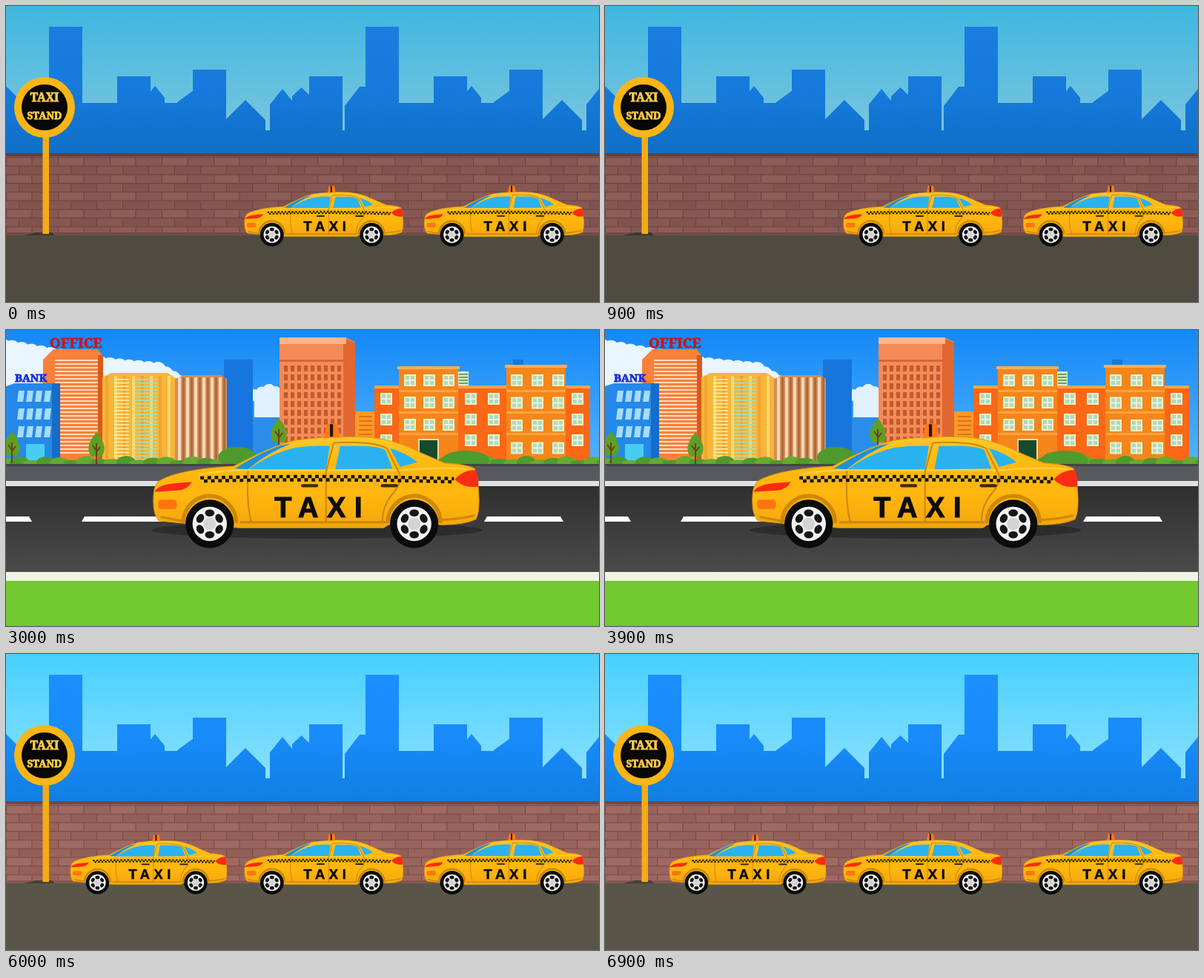
An HTML page for the animation above (7500 ms loop, 800x400 px).

```html
<!DOCTYPE html>
<html lang="en">
<head>
<meta charset="utf-8">
<title>Taxi ride</title>
<style>
html, body { margin: 0; width: 100%; height: 100%; overflow: hidden; }
svg { display: block; width: 100vw; height: 100vh; }
.serif { font-family: "Noto Serif", "Liberation Serif", serif; font-weight: 900; }
.plate { font-family: "Liberation Sans", Arial, sans-serif; font-weight: 700; letter-spacing: 11px; }
</style>
</head>
<body>
<svg id="stage" viewBox="0 0 800 400" preserveAspectRatio="none"></svg>
<script>
const SCENE_MS = 1500;

const range = (n, fn) => Array.from({ length: n }, (_, i) => fn(i)).join('');
const grid = (cols, rows, fn) => range(rows, r => range(cols, c => fn(c, r)));
const rect = (x, y, w, h, fill, extra = '') =>
  `<rect x="${x}" y="${y}" width="${w}" height="${h}" fill="${fill}" ${extra}/>`;
const path = (d, fill, extra = '') => `<path d="${d}" fill="${fill}" ${extra}/>`;
const line = (d, color, width, extra = '') =>
  path(d, 'none', `stroke="${color}" stroke-width="${width}" ${extra}`);
const oval = (x, y, rx, ry, fill, extra = '') =>
  `<ellipse cx="${x}" cy="${y}" rx="${rx}" ry="${ry}" fill="${fill}" ${extra}/>`;
const disc = (x, y, r, fill) => oval(x, y, r, r, fill);
const label = (text, x, y, size, fill, extra = '') =>
  `<text x="${x}" y="${y}" font-size="${size}" fill="${fill}" ${extra}>${text}</text>`;
const serif = (text, x, y, size, fill, extra = '') =>
  label(text, x, y, size, fill, `class="serif" stroke="${fill}" stroke-width=".8" ${extra}`);
const use = (id, x, y, s) => `<use href="#${id}" transform="translate(${x} ${y}) scale(${s})"/>`;
const drive = (x, y, s) => use('shadow', x, y, s) + use('taxi', x, y, s);

function gradient(id, y1, y2, ...colors) {
  const stops = colors.map((c, i) => `<stop offset="${i / (colors.length - 1)}" stop-color="${c}"/>`);
  return `<linearGradient id="${id}" gradientUnits="userSpaceOnUse" x1="0" x2="0" y1="${y1}" y2="${y2}">${stops.join('')}</linearGradient>`;
}

// Evenly spaced puffs along a ridge given by a few peaks and dips.
function cloud(ridge, r, base, fill) {
  const puffs = ridge.slice(1).map(([x2, y2], k) => {
    const [x1, y1] = ridge[k];
    const n = Math.ceil(Math.hypot(x2 - x1, y2 - y1) / (r * 1.4));
    return range(n + 1, i => {
      const t = i / n;
      return disc(x1 + (x2 - x1) * t, y1 + (y2 - y1) * t + r * 0.75, r, fill);
    });
  });
  const shape = ridge.map(([x, y]) => `${x} ${y + r}`).join('L');
  return path(`M${ridge[0][0]} ${base}L${shape}V${base}Z`, fill) + puffs.join('');
}

// A leafy mass: an ellipse edged with round lobes.
function canopy(x, y, rx, ry, lobes, fill) {
  const r = ry * 0.48;
  return oval(x, y, rx - r * 0.6, ry - r * 0.6, fill) + range(lobes, i => {
    const a = (i + 0.3) / lobes * 2 * Math.PI;
    return disc(x + (rx - r) * Math.cos(a), y + (ry - r) * Math.sin(a), r * (1 + 0.12 * Math.sin(5 * a)), fill);
  });
}

function wheel(x) {
  const y = 347;
  return disc(x, y, 31, '#0b0b0b') + disc(x, y, 22, '#f2f2f2') +
    range(6, i => {
      const angle = 30 + i * 60;
      return oval(x + 14, y, 4.6, 6, '#161616', `transform="rotate(${angle} ${x} ${y})"`);
    }) + disc(x, y, 8, '#d4d4d4');
}

function taxi() {
  const body = 'M181 314Q181 296 190 291Q215 277 284 273Q335 246 362 240Q405 233 458 236Q492 239 524 256L554 269Q584 271 592 276Q597 284 597 300Q600 330 594 341Q575 349 545 348H482L476 352H292Q230 348 188 343Q180 334 181 314Z';
  const glass = '#2ab2f0', seam = '#cd8808', ink = '#15130a';
  const belt = dy => `M241 ${288 + dy}Q400 ${284 + dy} 566 ${289 + dy}`;
  const arch = x => line(`M${x - 34} 346A34 35 0 0 1 ${x + 34} 346`, seam, 5);
  return path(body, 'url(#paint)', 'stroke="#e09a0c"') +
    line('M190 338Q215 343 222 344M292 345H478M546 342Q575 341 592 336', seam, 3) +
    line('M240 284Q280 276 330 278H500Q550 274 585 277', '#ffcf3e', 2) +
    path('M285 276Q318 255 345 246L357 244Q325 257 302 277Z', '#1c92dc') +
    path('M303 277Q332 256 364 249Q386 246 407 247L402 277ZM414 277L420 247H452Q470 248 478 252L487 276ZM484 250Q505 256 519 268L497 274Z', glass) +
    line('M412 243L402 280V346M412 243Q460 240 480 250L495 280Q502 292 486 310Q474 325 474 346M302 279Q300 320 306 344', seam, 2) +
    line(belt(0), ink, 4.2, 'stroke-dasharray="4.6"') +
    line(belt(4.2), ink, 4.2, 'stroke-dasharray="4.6" stroke-dashoffset="4.6"') +
    [370, 472].map(x => rect(x, 296, 22, 4, '#3a2c08', 'rx="2"')).join('') +
    path('M182 306Q187 297 207 295L230 293Q225 303 212 304Z', '#fb2a10') +
    rect(187, 316, 24, 12, '#ff7410', 'rx="4"') +
    path('M567 290Q577 278 594 278Q598 287 597 299Q579 302 567 290Z', '#f92c14') +
    path('M399 237L403 219Q410 217 417 219L420 236Z', '#ff7a18') + rect(407, 219, 4, 16, '#25160a') +
    [253, 515].map(x => arch(x) + wheel(x)).join('') +
    label('TAXI', 336, 338, 36, '#0c0c0c', 'class="plate" stroke="#0c0c0c" stroke-width="1"');
}

function sign() {
  return rect(49.5, 170, 8.5, 138, '#f5ac14') + disc(52, 137, 41, '#fab516') + disc(52, 137, 31, '#080705') +
    serif('TAXI', 52, 129, 15.5, '#ffcf45', 'text-anchor="middle"') +
    serif('STAND', 52, 152.5, 13.6, '#ffcf45', 'text-anchor="middle"');
}

// Skyline pieces share one fill and reach down to the same ground line.
const CITY_FLOOR = 211;
const tower = (x, top) => `M${x} ${CITY_FLOOR}V${top}h45V${CITY_FLOOR}Z`;
const gable = (x, w, peak, eave) =>
  `M${x} ${CITY_FLOOR}V${eave}L${x + w / 2} ${peak}L${x + w} ${eave}V${CITY_FLOOR}Z`;
const leanTo = x => `M${x} ${CITY_FLOOR}V135L${x + 20} 109H${x + 28}V${CITY_FLOOR}Z`;
const floor = (x, w, y) => `M${x} ${CITY_FLOOR}V${y}h${w}V${CITY_FLOOR}Z`;
const district = x => tower(x, 28) + floor(x + 40, 134, 131) + tower(x + 92, 95) +
  gable(x + 130, 26, 108, 124) + gable(x + 173, 44, 114, 130) + tower(x + 194, 86) +
  gable(x + 238, 54, 127, 154) + gable(x + 298, 34, 112, 133) + gable(x + 328, 25, 110, 122) +
  floor(x + 230, 197, 168);

function standScene(taxis, shade) {
  const city = floor(0, 60, 131) + gable(-14, 28, 108, 122) + leanTo(30) +
    district(58) + tower(409, 95) + leanTo(457) + district(485);
  return rect(0, 0, 800, 200, 'url(#standSky)') + path(city, 'url(#standCity)') +
    rect(0, 200, 800, 111, 'url(#bricks)') + rect(0, 199, 800, 4, '#704944') +
    rect(0, 306, 800, 4, '#855750') + rect(0, 310, 800, 90, '#5a5549') +
    path('M24 310L40 306H62L66 310Z', '#453f38') +
    rect(0, 0, 800, 400, '#000', `opacity="${shade}"`) +
    use('sign', 0, 0, 1) + taxis.map(p => use('taxi', ...p)).join('');
}

function trees(x, y, s, [dark, mid, deep, fresh, bright]) {
  const bark = '#96461f';
  const art = canopy(465, 80, 56, 40, 7, dark) + canopy(556, 62, 46, 34, 7, dark) +
    canopy(522, 38, 84, 46, 9, mid) + canopy(470, 64, 36, 24, 6, mid) +
    line('M541 104Q538 82 530 72L497 46M533 74L543 48', bark, 6) +
    canopy(522, 176, 46, 30, 7, deep) + canopy(614, 178, 48, 37, 7, deep) +
    canopy(564, 145, 94, 52, 10, fresh) + canopy(578, 122, 52, 28, 8, bright) +
    path('M561 248Q566 210 562 180L554 154L566 174V150L569 190L598 176L571 202Q568 225 569 248Z', bark);
  return `<g transform="translate(${x} ${y}) scale(${s}) translate(-565 -247)">${art}</g>`;
}

function countryScene() {
  const dash = x => path(`M${x - 20} 2Q${x - 16} -3 ${x} -3H${x + 13}L${x + 20} 2Q${x} 4 ${x - 20} 2Z`,
    '#f5f5f5', `transform="translate(0 ${348 + x / 150})"`);
  return rect(0, 0, 800, 260, 'url(#countrySky)') +
    path('M0 194Q30 188 60 202L122 218Q155 202 176 205Q230 212 272 225Q330 204 350 203L460 228Q500 194 535 195Q590 202 610 222Q680 195 730 193Q780 196 800 206V260H0Z', '#96b7d8') +
    path('M0 217Q45 198 85 225L122 250H0ZM488 250Q500 232 512 238Q530 215 552 232L562 250ZM605 246Q655 190 720 245ZM700 246Q725 175 800 216V250Z', '#468ccb') +
    path('M0 248Q120 250 185 244L400 249L600 244Q720 240 800 245V310H0Z', '#d8cc91') +
    path('M0 249Q55 267 122 256Q165 258 236 278V310H0ZM490 256Q590 262 660 262Q720 246 800 243V310H490Z', 'url(#hill)') +
    trees(247, 251, 0.49, ['#255f1e', '#347638', '#55932f', '#72b43a', '#93ce4c']) +
    trees(725, 249, 0.38, ['#28501a', '#35601f', '#4f7627', '#6b932c', '#84a838']) +
    trees(565, 247, 1, ['#265f1e', '#397a2a', '#559420', '#78b62a', '#9fd52f']) +
    rect(0, 303, 800, 14, '#9b8777') + rect(0, 282, 800, 3, '#d9dddd') + rect(0, 294, 800, 3, '#d9dddd') +
    range(64, i => rect(i * 12.6 + 1, 277, 7, 26, '#e6eaea', 'rx="3"')) +
    rect(0, 315, 800, 85, 'url(#countryRoad)') +
    [49, 205, 375, 556, 730].map(dash).join('') + drive(0, 0, 1);
}

function bushyTree(x, y) {
  return path(`M${x} ${y - 43}q17 20 7 33h-14q-10 -13 7 -33Z`, '#5f9f25') +
    line(`M${x} ${y}v-28m0 12l5 -7m-5 5l-5 -7`, '#6b4318', 2);
}

function windows(x, y, cols, rows, dx, dy) {
  return grid(cols, rows, (c, r) => {
    const left = x + c * dx, top = y + r * dy;
    return rect(left, top, 16, 16, '#f3efc4') + rect(left + 2, top + 2, 12, 12, '#a9dcc4') +
      line(`M${left + 8} ${top}v16M${left} ${top + 8}h16`, '#f6f0cc', 1.8);
  });
}

function apartments() {
  const block = (x, y) => rect(x, y, 80, 178 - y, '#f4861c') + rect(x - 2, y - 2, 84, 4, '#ffad55') +
    range(3, i => rect(x, 81 + i * 29, 80, 3, '#ffa33d'));
  return rect(610, 56, 14, 24, '#dcebd0') + range(5, i => rect(611, 59 + i * 4, 12, 1.8, '#5f9c52')) +
    rect(497, 77, 291, 101, '#fb6817') + rect(497, 75, 291, 4, '#ffa04a') +
    block(530, 51) + block(675, 49) +
    windows(537, 60, 3, 3, 26, 30) + windows(681, 60, 3, 4, 28, 30.5) +
    windows(505, 85, 1, 3, 0, 28) + windows(619, 85, 2, 3, 31, 28) + windows(763, 85, 1, 3, 0, 28) +
    rect(556, 147, 28, 31, '#f6d9a0') + rect(558, 149, 24, 29, '#174a2c');
}

function offices() {
  return path('M50 40L64 26H124L131 36V180H50Z', '#f9813a') + rect(124, 34, 7, 146, '#d9591c') +
    range(26, i => rect(66, 40 + i * 5, 58, 2, '#ffdcc0')) +
    path('M0 76L12 72H73V182H0Z', '#2589ea') + rect(62, 72, 11, 110, '#166cc9') +
    grid(4, 3, (c, r) => path(`M${17 + c * 12} ${82 + r * 24}h8l-2 15h-8Z`, '#a6dcfa')) +
    rect(27, 154, 25, 27, '#48cdf2') +
    path('M130 64L142 58H218L230 66V182H130Z', '#f7b638') +
    range(8, i => rect(134 + i * 12, 62, 4, 118, i % 2 ? '#ffd770' : '#f2a233')) +
    range(24, i => rect(146, 66 + i * 4.7, 20, 1.6, '#fff0a8') + rect(174, 66 + i * 4.7, 30, 1.8, '#a4dfb5')) +
    path('M228 66L240 61H290L298 66V180H228Z', '#d48d58') +
    range(6, i => rect(232 + i * 11, 64, 4, 115, '#f6d9b8') + rect(238 + i * 11, 64, 3, 115, '#b06a3c')) +
    path('M369 10H458L471 16V160H369Z', '#f58a56') + path('M455 10L471 17V160H455Z', '#e0672f') +
    rect(369, 10, 90, 9, '#ffb489') + rect(369, 40, 90, 3, '#d76638') +
    grid(9, 9, (c, r) => rect(375 + c * 9, 48 + r * 12, 5, 8, '#c05a30')) +
    rect(471, 110, 26, 68, '#fb9a26') + range(6, i => rect(476, 116 + i * 6, 18, 2, '#e06f16'));
}

function townScene() {
  const dash = (x, w) => path(`M${x + 4} 252h${w - 8}l4 7h${-w}Z`, '#fff');
  const bushes = range(46, i => oval(i * 18, 179, 13, 6 + 3 * Math.sin(i * 2.3), i % 2 ? '#4f9a2c' : '#65ab30'));
  return rect(0, 0, 800, 185, 'url(#townSky)') +
    cloud([[-5, 14], [60, 26], [140, 40], [205, 46], [245, 70]], 11, 130, '#e9f5ff') +
    cloud([[335, 82], [355, 75], [380, 84]], 8, 122, '#e2f1ff') +
    rect(294, 40, 39, 135, '#1676dd') + rect(333, 118, 36, 60, '#2b8dea') + rect(684, 40, 14, 40, '#1676dd') +
    offices() + apartments() + bushes +
    oval(312, 172, 26, 14, '#4f9a2c') + oval(620, 176, 32, 13, '#4f9a2c') +
    bushyTree(8, 180) + bushyTree(122, 181) + bushyTree(368, 162) +
    rect(0, 181, 800, 24, '#58595c') + rect(0, 181, 800, 3, '#434448') +
    rect(0, 204, 800, 7, '#dfe2e4') + rect(0, 211, 800, 116, 'url(#townRoad)') +
    dash(-60, 95) + dash(102, 130) + dash(645, 107) +
    rect(0, 327, 800, 12, '#eef5e4') + rect(0, 339, 800, 61, '#72c82f') +
    serif('BANK', 12, 70, 14.8, '#1b2be0') + serif('OFFICE', 59, 24, 18.8, '#c8161c') +
    drive(8.4, -103.4, 1.053);
}

function cityScene() {
  const ridge = [[-5, 137], [60, 137], [92, 106], [195, 103], [250, 68], [290, 100], [345, 68], [425, 96],
    [468, 136], [510, 98], [556, 132], [660, 142], [700, 163], [765, 142]];
  const city = district(-43) + tower(308, 95) + leanTo(356) + district(384) + leanTo(729) + tower(757, 28);
  return rect(0, 0, 800, 260, 'url(#citySky)') + cloud(ridge, 12, 230, '#e0f2ff') +
    rect(0, 160, 800, 60, 'url(#haze)') +
    path(city, 'url(#cityBlue)', 'transform="translate(0 49)"') +
    rect(0, 257, 800, 22, '#c7c7c7') + rect(0, 257, 800, 2, '#b4bac0') + rect(0, 277, 800, 3, '#8a8a8a') +
    rect(0, 280, 800, 120, 'url(#cityRoad)') +
    range(6, i => rect(62 + i * 141, 353, 79, 10, '#fff')) +
    oval(119, 260, 26, 2, '#8f9296') + use('sign', 96, 45, 0.715) + drive(86.5, 55.8, 0.721);
}

const defs = `<defs>
${gradient('paint', 236, 350, '#ffc62a', '#ffb80f', '#ffb60e', '#f3a70b')}
${gradient('standSky', 0, 170, '#47d0ff', '#8ae0fd')}
${gradient('standCity', 28, 200, '#1d8fff', '#188bfa', '#117ee2')}
${gradient('countrySky', 0, 230, '#28a4ff', '#4cb8ff', '#98dafd')}
${gradient('hill', 245, 305, '#2f9638', '#1f7a2c')}
${gradient('countryRoad', 315, 400, '#454243', '#545152')}
${gradient('townSky', 0, 180, '#1488f6', '#52b2ff')}
${gradient('townRoad', 211, 327, '#2f2f30', '#4b4a4b')}
${gradient('citySky', 0, 200, '#66b0e8', '#5fa6e2')}
${gradient('haze', 160, 220, '#9fd2ff00', '#9fd2ff')}
${gradient('cityBlue', 28, 209, '#168dff', '#148af8', '#0d79df')}
${gradient('cityRoad', 280, 400, '#292929', '#4b4949')}
<pattern id="bricks" x="0" y="204" width="70" height="23.4" patternUnits="userSpaceOnUse">
${rect(0, 0, 70, 23.4, '#9a645e')}${rect(0, 1, 35, 10, '#a06a63')}${rect(17, 12.7, 35, 10, '#945f59')}
${line('M0 .6H70M0 12.3H70M.6 0V12M35 0V12M17.5 12V23.4M52.5 12V23.4', '#7b4e46', 1.2)}
</pattern>
<g id="shadow">${oval(390, 355, 212, 11, '#000', 'opacity=".28"')}</g>
<g id="taxi">${taxi()}</g><g id="sign">${sign()}</g>
</defs>`;

const parked = [[229, 131, 0.513], [471, 130, 0.516]];
const scenes = [
  standScene(parked, 0.12),
  countryScene(),
  townScene(),
  cityScene(),
  standScene([[-4.6, 133.4, 0.506], ...parked], 0)
];

const stage = document.getElementById('stage');
stage.innerHTML = defs + scenes.map(s => `<g>${s}</g>`).join('');
const groups = [...stage.children].slice(1);
const start = performance.now();

function render(time) {
  const current = Math.floor(Math.max(0, time) / SCENE_MS) % groups.length;
  groups.forEach((g, i) => g.setAttribute('display', i === current ? 'inline' : 'none'));
}

function tick() {
  render(performance.now() - start);
  requestAnimationFrame(tick);
}
tick();
</script>
</body>
</html>
```
